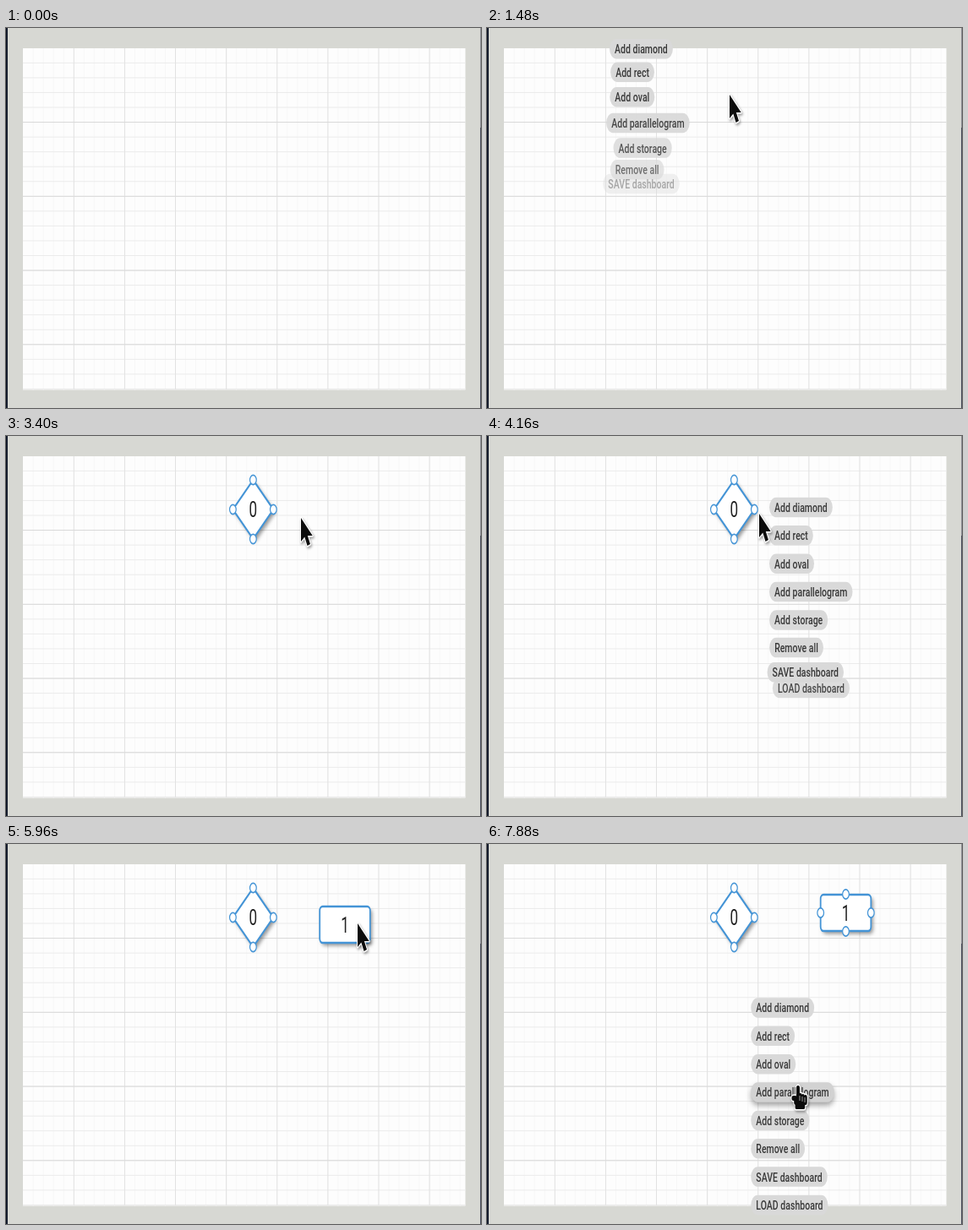
An HTML page with a canvas for the animation above (8 s loop, 562 by 450 pixels).

```html
<!DOCTYPE html>
<html lang="en">
<head>
<meta charset="utf-8">
<title>Flowchart board</title>
<style>
  html, body { margin: 0; width: 100%; height: 100%; overflow: hidden; background: #d7d8d3; }
  canvas { display: block; }
</style>
</head>
<body>
<canvas id="stage" width="562" height="450"></canvas>
<script>
const ctx = document.getElementById('stage').getContext('2d');
const LOOP = 8000, STEP = 40;
const SX = 0.685; // the whole scene is narrowed horizontally
const BLUE = '#4494d6';
const FONT = 'Roboto, sans-serif';

const LABELS = ['Add diamond', 'Add rect', 'Add oval', 'Add parallelogram',
  'Add storage', 'Remove all', 'SAVE dashboard', 'LOAD dashboard'];
const PITCH = 33.35, PILL_H = 23.5, PAD = 8.8, SPEED = 200;

const MENUS = [
  { x: 145, y: 31, open: 1480, close: 2800 },
  { x: 334, y: 84.5, open: 4040, close: 5120 },
  { x: 312.3, y: 194, open: 6760, close: Infinity }
];

const DIAMOND = { x: 292.4, y: 87, born: 2960, ready: 3120 };
const RECT = { born: 5320, ready: 6120 };
const DRAG = { start: 5840, end: 6080, from: { x: 392.5, y: 108 }, to: { x: 439.5, y: 80 } };

// The pointer rests between these moves.
const ENTER = { x: 474, y: -34 };
const MOVES = [
  { start: 320, end: 800, x: 212, y: 125 },
  { start: 800, end: 1120, x: 290, y: 95 },
  { start: 1160, end: 1320, x: 287, y: 79 },
  { start: 1880, end: 2280, x: 226, y: 105 },
  { start: 2280, end: 2680, x: 209, y: 33 },
  { start: 2840, end: 3400, x: 349, y: 97 },
  { start: 3560, end: 3960, x: 322, y: 92 },
  { start: 4440, end: 4920, x: 367, y: 115 },
  { start: 5320, end: 5640, ...DRAG.from },
  { start: DRAG.start, end: DRAG.end, ...DRAG.to },
  { start: 6160, end: 6720, x: 340, y: 200 },
  { start: 7040, end: 7680, x: 366, y: 285 },
  { start: 7780, end: 7880, x: 368, y: 288 }
];

const clamp = v => Math.max(0, Math.min(1, v));
const smooth = v => v * v * (3 - 2 * v);

function cursorAt(t) {
  let { x, y } = ENTER;
  for (const move of MOVES) {
    const k = smooth(clamp((t - move.start) / (move.end - move.start)));
    x += (move.x - x) * k;
    y += (move.y - y) * k;
  }
  return { x, y };
}

// Run a drawing in square units around a stage point.
function at(x, y, draw) {
  ctx.save();
  ctx.translate(x, y);
  ctx.scale(SX, 1);
  draw();
  ctx.restore();
}

function shadow(color, blur, x, y) {
  ctx.shadowColor = color;
  ctx.shadowBlur = blur;
  ctx.shadowOffsetX = x;
  ctx.shadowOffsetY = y;
}

function polygon(points) {
  const path = new Path2D();
  points.forEach(([x, y]) => path.lineTo(x, y));
  path.closePath();
  return path;
}

function roundBox(x, y, w, h, r) {
  const path = new Path2D();
  path.roundRect(x, y, w, h, r);
  return path;
}

function gridLines(step, vertical, horizontal) {
  ctx.fillStyle = vertical;
  for (let x = 20.2 + step * SX; x < 543; x += step * SX) ctx.fillRect(x - 0.5, 24, 1, 404.5);
  ctx.fillStyle = horizontal;
  for (let y = 23.8 + step; y < 428; y += step) ctx.fillRect(20, y - 0.5, 523.5, 1);
}

function drawBoard() {
  ctx.fillStyle = '#d7d8d3';
  ctx.fillRect(0, 0, 562, 450);
  ctx.fillStyle = '#141a2c';
  ctx.fillRect(0, 0, 2, 450);
  ctx.fillStyle = '#8d8f95';
  ctx.fillRect(561, 0, 1, 118);
  ctx.fillStyle = '#4a4d5c';
  ctx.fillRect(561, 118, 1, 332);
  ctx.fillStyle = '#fdfdfd';
  ctx.fillRect(20, 24, 523.5, 404.5);
  gridLines(17.55, '#f7f7f7', '#ebebeb');
  gridLines(87.75, '#e2e2e2', '#dadada');
}

function drawNode(x, y, label, outline, handles) {
  at(x, y, () => {
    ctx.lineWidth = 2.6;
    ctx.strokeStyle = BLUE;
    ctx.fillStyle = '#fff';
    ctx.save();
    shadow('rgba(0,0,0,0.4)', 4, 2.5, 3.5);
    ctx.fill(outline);
    ctx.restore();
    ctx.stroke(outline);
    ctx.lineWidth = 1.8;
    for (const [hx, hy] of handles) {
      const knob = roundBox(hx - 5.6, hy - 5.6, 11.2, 11.2, 5.6);
      ctx.fill(knob);
      ctx.stroke(knob);
    }
    ctx.fillStyle = '#222';
    ctx.font = '25px ' + FONT;
    ctx.textAlign = 'center';
    ctx.fillText(label, 0, 9);
  });
}

const around = (w, h) => [[0, -h], [w, 0], [0, h], [-w, 0]];

function drawNodes(t, cursor) {
  if (t >= DIAMOND.born) {
    const corners = around(35, 35);
    drawNode(DIAMOND.x, DIAMOND.y, '0', polygon(corners), t >= DIAMOND.ready ? corners : []);
  }
  if (t >= RECT.born) {
    const grip = t < DRAG.start ? DRAG.from : t < DRAG.end ? cursor : DRAG.to;
    const box = roundBox(-43.5, -21.5, 87, 43, 5);
    drawNode(grip.x - 15, grip.y + 1.5, '1', box, t >= RECT.ready ? around(43.5, 22) : []);
  }
}

// Items start one after another, bunched in the middle, and sway from side to side.
const lag = i => 0.545 + 0.04 * (i - 2.7) + 0.0057 * (i - 2.7) ** 3;
const sway = i => 1.4 * i * Math.cos(2 * Math.PI * (i - 1.3) / 3);

function itemPose(menu, i, t) {
  if (t >= menu.close) {
    const q = clamp((t - menu.close) / SPEED);
    return { dx: sway(i) * q, dy: -10 * q, alpha: 1 - q };
  }
  const q = Math.max(0, lag(i) - (t - menu.open) / SPEED);
  return {
    dx: sway(i) * q / lag(i),
    dy: -60 * q * q,
    alpha: q < 1 ? clamp(0.2 + 1.65 * (1 - q)) : 0
  };
}

// Draws one menu and tells whether the pointer is over an item.
function drawMenu(menu, t, cursor) {
  if (t < menu.open || t >= menu.close + SPEED) return false;
  const settled = t >= menu.open + 240 && t < menu.close;
  let over = false;
  ctx.font = '500 15.36px ' + FONT;
  ctx.textAlign = 'left';
  LABELS.forEach((label, i) => {
    const { dx, dy, alpha } = itemPose(menu, i, t);
    const y = menu.y + i * PITCH;
    const w = ctx.measureText(label).width + 2 * PAD;
    const hit = settled && cursor.x > menu.x && cursor.x < menu.x + w * SX &&
      Math.abs(cursor.y - y) < PILL_H / 2;
    over = over || hit;
    at(menu.x + dx, y + dy, () => {
      ctx.globalAlpha = alpha;
      ctx.save();
      if (hit) shadow('rgba(0,0,0,0.35)', 6, 0, 4);
      ctx.fillStyle = hit ? '#d2d2d2' : '#d9d9d9';
      ctx.fill(roundBox(0, -PILL_H / 2, w, PILL_H, PILL_H / 2));
      ctx.restore();
      ctx.fillStyle = '#383838';
      ctx.fillText(label, PAD, 5.4);
    });
  });
  return over;
}

function handShape() {
  const path = new Path2D();
  path.roundRect(-3, -2, 6, 20, 3); // pointing finger
  for (let i = 1; i < 4; i++) path.roundRect(-3 + 4.4 * i, 6 + i, 5.5, 12, 2.5);
  path.roundRect(-11, 10, 9, 6, 3); // thumb
  path.roundRect(-7, 12, 22, 9, 3);
  path.roundRect(-5, 15, 17, 11, 2);
  return path;
}

const HAND = handShape();
const ARROW = polygon([[0, 0], [0, 28], [6.3, 22.5], [11, 33], [16, 31], [11.5, 21], [20, 21]]);

function drawCursor({ x, y }, hand) {
  const shape = hand ? HAND : ARROW;
  at(x, y, () => {
    ctx.lineJoin = 'round';
    ctx.save();
    shadow('rgba(0,0,0,0.4)', 3, 1, 2);
    ctx.strokeStyle = '#fff';
    ctx.lineWidth = 3;
    ctx.stroke(shape);
    ctx.restore();
    ctx.fillStyle = '#0c0c0c';
    ctx.fill(shape);
    if (!hand) return;
    ctx.fillStyle = '#ddd';
    for (let i = 1; i < 4; i++) ctx.fillRect(4.4 * i - 2, 9 + i, 1, 6);
  });
}

function render(t) {
  const cursor = cursorAt(t);
  drawBoard();
  drawNodes(t, cursor);
  const hand = MENUS.map(menu => drawMenu(menu, t, cursor)).some(Boolean);
  if (t >= MOVES[0].start) drawCursor(cursor, hand);
}

const begin = performance.now();
function tick() {
  const t = (performance.now() - begin) % LOOP;
  render(Math.floor(t / STEP) * STEP);
  requestAnimationFrame(tick);
}
tick();
</script>
</body>
</html>
```
